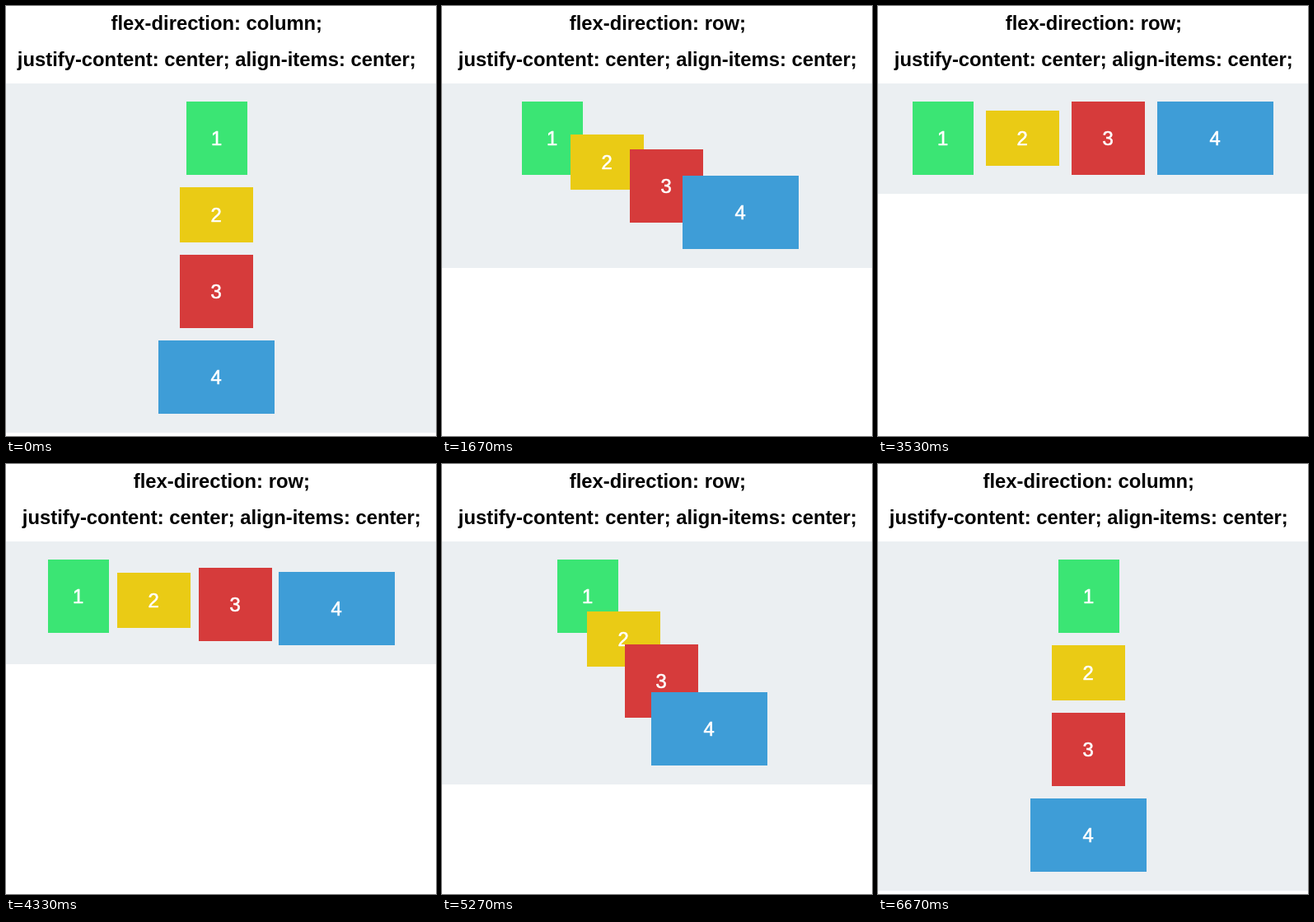
An HTML page with a canvas that plays this animation: 522x522 px, repeating every 6.74 s.

```html
<!DOCTYPE html>
<html lang="en">
<head>
<meta charset="utf-8">
<title>flex-direction</title>
<style>
  html, body { margin: 0; width: 522px; height: 522px; overflow: hidden; background: #fff; }
  canvas { display: block; }
</style>
</head>
<body>
<canvas id="stage" width="522" height="522"></canvas>
<script>
const ctx = document.getElementById('stage').getContext('2d');
const LOOP = 6740, STEP = 1000 / 15;
const TOP = 93.7, PAD = 22.3, GAP = 14.9;
const COLUMN_CENTER = 255.8, ROW_CENTER = 261.3;

const boxes = [
  { w: 74.4, h: 89.3, color: '#3be574' },
  { w: 89.3, h: 67, color: '#eacb15' },
  { w: 89.3, h: 89.3, color: '#d63b3b' },
  { w: 141.4, h: 89.3, color: '#3e9dd7' }
];

// Both layouts are computed once; the animation blends between them.
const rowHeight = Math.max(...boxes.map(b => b.h));
const rowWidth = boxes.reduce((sum, b) => sum + b.w + GAP, -GAP);
let nextX = ROW_CENTER - rowWidth / 2;
let nextY = TOP + PAD;
for (const b of boxes) {
  b.column = { x: COLUMN_CENTER - b.w / 2, y: nextY };
  b.row = { x: nextX, y: TOP + PAD + (rowHeight - b.h) / 2 };
  nextX += b.w + GAP;
  nextY += b.h + GAP;
}
const columnBottom = nextY - GAP + PAD;
const rowBottom = TOP + rowHeight + 2 * PAD;

const mix = (a, b, p) => a + (b - a) * p;
const clamp = v => Math.min(1, Math.max(0, v));

// cubic-bezier(.25, .1, .25, 1)
function ease(x) {
  if (x <= 0 || x >= 1) return clamp(x);
  let lo = 0, hi = 1;
  for (let i = 0; i < 24; i++) {
    const s = (lo + hi) / 2;
    if (0.75 * s * (1 - s) + s ** 3 < x) lo = s; else hi = s;
  }
  return 0.3 * lo * (1 - lo) ** 2 + 3 * lo * lo * (1 - lo) + lo ** 3;
}

// 0 is the column, 1 is the row; the way back plays the same curve in reverse.
const progress = t => t < 3340 ? ease((t - 880) / 1940) : ease(1 - (t - 3750) / 2068);

function label(text, x, y, color, weight) {
  ctx.font = `${weight} 23.8px "Liberation Sans", Helvetica, Arial, sans-serif`;
  ctx.fillStyle = color;
  ctx.fillText(text, x, y);
}

function draw(t) {
  const p = progress(t);
  const isRow = t >= 866 && t < 5830;
  const titleX = isRow ? 261.8 : 255.8;

  ctx.fillStyle = '#fff';
  ctx.fillRect(0, 0, 522, 522);
  ctx.textAlign = 'center';
  label(`flex-direction: ${isRow ? 'row' : 'column'};`, titleX, 29, '#000', 'bold');
  label('justify-content: center; align-items: center;', titleX, 73, '#000', 'bold');

  ctx.fillStyle = '#ebeff2';
  const top = Math.round(TOP);
  ctx.fillRect(0, top, 522, Math.round(mix(columnBottom, rowBottom, p)) - top);

  boxes.forEach((b, i) => {
    const x = Math.round(mix(b.column.x, b.row.x, p));
    const y = Math.round(mix(b.column.y, b.row.y, p));
    const w = Math.round(b.w), h = Math.round(b.h);
    ctx.fillStyle = b.color;
    ctx.fillRect(x, y, w, h);

    // A thin outline gives the digits their slightly heavier weight.
    const digit = [i + 1, x + w / 2 - 0.3, y + h / 2 + 8.5];
    label(...digit, '#fff', 'normal');
    ctx.strokeStyle = '#fff';
    ctx.lineWidth = 0.6;
    ctx.strokeText(...digit);
  });
}

function tick() {
  const t = performance.now() % LOOP;
  draw(Math.floor((t + 4) / STEP) * STEP);
  requestAnimationFrame(tick);
}
tick();
</script>
</body>
</html>
```
